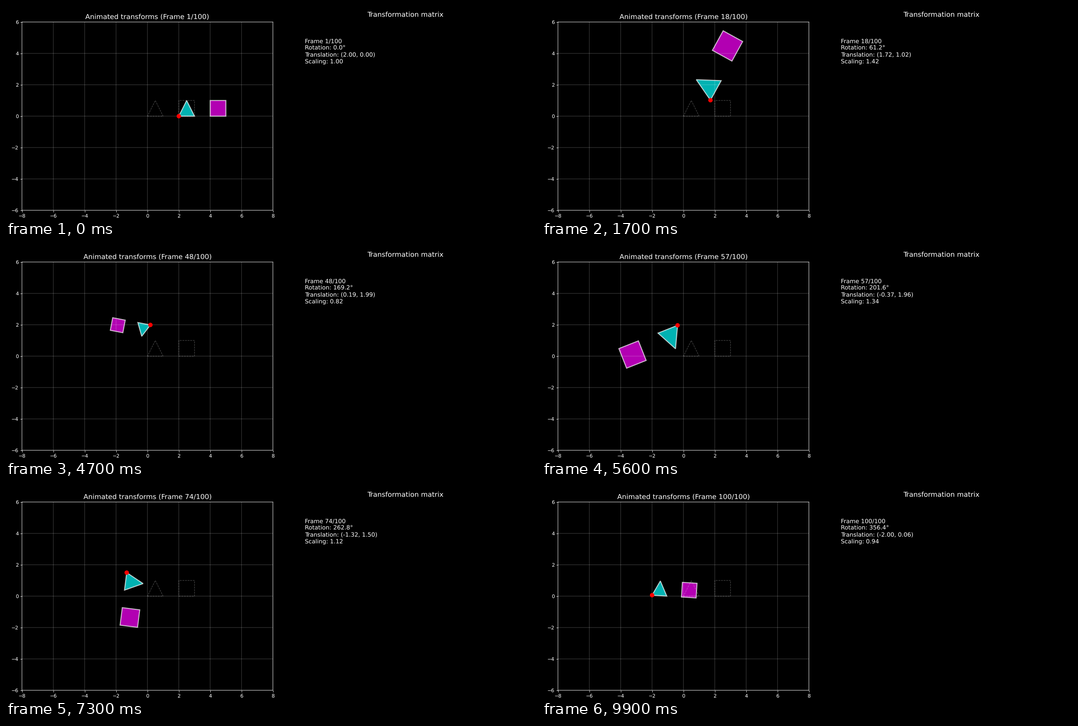
A matplotlib script for the animation above (10000 ms loop, 1183x473 px).

```python
import numpy as np
import matplotlib.pyplot as plt
from matplotlib.animation import FuncAnimation
from matplotlib.patches import Circle, Polygon

W, H = 1183, 473
DPI = 78.8667
FRAMES = 100

plt.style.use("dark_background")
plt.rcParams["font.family"] = "DejaVu Sans"
plt.rcParams["text.hinting"] = "none"

TRIANGLE = np.array([[0, 0], [1, 0], [0.5, 1]])
SQUARE = np.array([[2, 0], [3, 0], [3, 1], [2, 1]])


def add_axes(left, top, right, bottom):
    """Add axes with edges given in pixels from the top left."""
    return fig.add_axes([left / W, 1 - bottom / H,
                         (right - left) / W, (bottom - top) / H])


def motion(i):
    """Return angle in degrees, shift and scale for step i."""
    t = i / FRAMES
    shift = 2 * np.array([np.cos(np.pi * t), np.sin(np.pi * t)])
    return 360 * t, shift, 1 + 0.5 * np.sin(4 * np.pi * t)


def transform(points, angle, shift, scale):
    a = np.radians(angle)
    rot = np.array([[np.cos(a), -np.sin(a)], [np.sin(a), np.cos(a)]])
    return scale * points @ rot.T + shift


fig = plt.figure(figsize=((W + 0.01) / DPI, (H + 0.01) / DPI), dpi=DPI)

ax = add_axes(35.65, 35.75, 595.8, 455.85)
ax.set_xlim(-8, 8)
ax.set_ylim(-6, 6)
ax.grid(True, alpha=0.3)
title = ax.set_title("", fontsize=14)

# Unsnapped lines keep their fractional pixel positions.
for line in [*ax.get_xgridlines(), *ax.get_ygridlines(),
             *ax.spines.values()]:
    line.set_snap(False)

movers = []
for shape, color in ((TRIANGLE, "cyan"), (SQUARE, "magenta")):
    outline = np.vstack([shape, shape[:1]])
    ax.plot(*outline.T, "w--", linewidth=1, alpha=0.3, snap=False)
    patch = Polygon(shape, facecolor=color, edgecolor="white",
                    linewidth=2, alpha=0.7, snap=False)
    ax.add_patch(patch)
    movers.append((shape, patch))
dot = ax.add_patch(Circle((0, 0), 0.1408, color="red", linewidth=0, zorder=3))

panel = add_axes(611, 30.2, 1171.2, 461.4)
panel.axis("off")
panel.set_title("Transformation matrix", fontsize=14)
info = panel.text(0.1, 0.9, "", transform=panel.transAxes,
                  fontsize=12, va="top", linespacing=1.25)


def update(i):
    angle, shift, scale = motion(i)
    for shape, patch in movers:
        patch.set_xy(transform(shape, angle, shift, scale))
    dot.set_center(shift)
    count = f"Frame {i + 1}/{FRAMES}"
    title.set_text(f"Animated transforms ({count})")
    info.set_text(f"{count}\n"
                  f"Rotation: {angle:.1f}°\n"
                  f"Translation: ({shift[0]:.2f}, {shift[1]:.2f})\n"
                  f"Scaling: {scale:.2f}")
    return [patch for _, patch in movers] + [dot, title, info]


anim = FuncAnimation(fig, update, frames=FRAMES, interval=100,
                     repeat=True, repeat_delay=0, blit=False)
plt.show()
```
